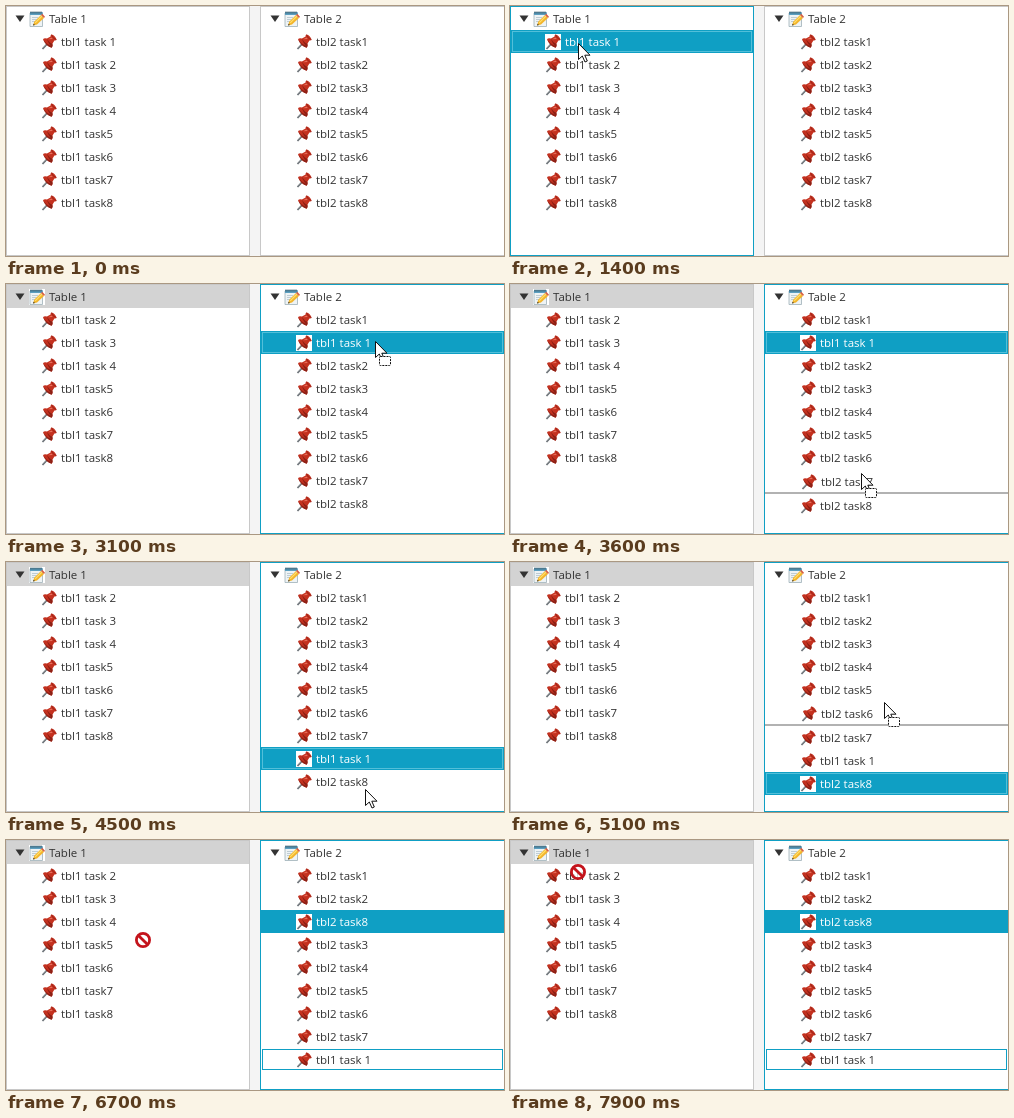
Write an HTML page that moves like this. It is 498x250 px and loops after 8 s.

```html
<!DOCTYPE html>
<html lang="en">
<head>
<meta charset="utf-8">
<title>Drag tasks between trees</title>
<style>
  html, body { margin: 0; width: 100%; height: 100%; overflow: hidden; background: #f4f4f4; }
  svg { display: block; }
  text { font: 11.5px "Open Sans", "Noto Sans", sans-serif; white-space: pre; }
</style>
</head>
<body>
<svg width="498" height="250" viewBox="0 0 498 250">
  <defs>
    <g id="pin">
      <path d="M1.5 15 7 9" stroke="#555b60" stroke-width="1.7"/>
      <path d="M1.5 15 6 10" stroke="#a9b0b5" stroke-width=".6"/>
      <path d="M2 5.2Q3.2 3.8 6 4.6L9.6 2.6Q9.2 1 10.6.5 13.6 1.2 15.6 5.4 15 6.8 13.4 6.4L11.4 9.8Q12.2 12.6 10.6 13.8 4.6 11.6 2 5.2Z" fill="#c4311f"/>
      <path d="M2 5.2Q4.6 11.6 10.6 13.8 12.2 12.6 11.4 9.8 7.6 8.6 6 4.6 7 9.6 10.2 11.8 5 10 2 5.2Z" fill="#8c2015"/>
      <path d="M7.2 5.2 10.4 3.4 11.8 5Z" fill="#e8705c"/>
      <path d="M10.6.7Q11.4 4.4 15.4 5.6" fill="none" stroke="#98251a" stroke-width=".8"/>
    </g>
    <g id="pad">
      <path d="M1 2H13.5V15.5H1Z" fill="#eef3f5" stroke="#9fb0b8" stroke-width=".8"/>
      <path d="M1 1.2H13.8V4H1Z" fill="#5c9fc0"/>
      <path d="M1.5 1.5H13.5" stroke="#27495a" stroke-width="2" stroke-dasharray="1 1"/>
      <path d="M3 6.5H9M3 8.5H7.5M3 10.5H6" stroke="#b3c3cb" stroke-width=".8"/>
      <path d="M4 14.6 5.2 10.8 12 4 15 7 8 13.6Z" fill="#f3b52c"/>
      <path d="M6.2 11.8 13 5" stroke="#ffdf6b" stroke-width="1.2"/>
      <path d="M12 4 13.3 2.8 16 5.7 15 7Z" fill="#d95f45"/>
      <path d="M4 14.6 4.6 12.7 6 14.1Z" fill="#333"/>
    </g>
    <path id="arrow" d="M.5.5V16.5L4.3 13 7 19 9.3 18 6.8 12.2H12Z" fill="#fff" stroke="#111"/>
    <g id="drag">
      <use href="#arrow"/>
      <rect x="4.5" y="15.5" width="11" height="9" rx="1" fill="#fff" stroke="#111" stroke-dasharray="2 1"/>
    </g>
    <g id="deny" fill="none" stroke="#c4141c" stroke-width="2.8">
      <circle r="6.6" fill="#fff" fill-opacity=".75"/>
      <path d="M-4.6-4.6 4.6 4.6"/>
    </g>
  </defs>
  <g id="trees"></g>
  <use id="cursor"/>
</svg>
<script>
const LOOP = 8000, TICK = 100, ROW = 23;
const BLUE = '#0f9fc4', RING = '#52bfd9', GREY = '#d3d3d3';
const PANELS = [{ x: 0, w: 244, dx: 0 }, { x: 254, w: 245, dx: 255 }];

const nums = [1, 2, 3, 4, 5, 6, 7, 8];
const ones = nums.map(n => `tbl1 task${n < 5 ? ' ' : ''}${n}`);
const twos = nums.map(n => `tbl2 task${n}`);
const rest = ones.slice(1), moved = ones[0];
const insert = (list, i, item) => [...list.slice(0, i), item, ...list.slice(i)];
const second = insert(twos, 1, moved);
const third = insert(twos, 7, moved);
const fourth = [...insert(twos.slice(0, 7), 2, twos[7]), moved];

// sel: selected row per panel; ring: focused row of the active panel
const STATES = [
  { at: 0, lists: [ones, twos], sel: [-1, -1], active: -1, ring: -1 },
  { at: 1100, lists: [ones, twos], sel: [1, -1], active: 0, ring: 1 },
  { at: 2300, lists: [rest, second], sel: [0, 2], active: 0, ring: 0 },
  { at: 3000, lists: [rest, second], sel: [0, 2], active: 1, ring: 2 },
  { at: 4000, lists: [rest, third], sel: [0, 8], active: 1, ring: 8 },
  { at: 4700, lists: [rest, third], sel: [0, 9], active: 1, ring: 9 },
  { at: 5900, lists: [rest, fourth], sel: [0, 3], active: 1, ring: 9 }
];

// time, x, y, cursor shape from that time on
const PATH = [
  [0, 346, 150, ''], [100, 346, 150, 'arrow'], [900, 68, 37, 'arrow'],
  [1500, 68, 37, 'drag'], [1800, 340, 40, 'drag'], [2100, 371, 46, 'drag'],
  [2300, 371, 46, 'arrow'], [2700, 371, 46, 'arrow'], [2900, 369, 57, 'arrow'],
  [3100, 369, 57, 'drag'], [3500, 351, 189, 'drag'], [4000, 351, 189, 'arrow'],
  [4400, 359, 227, 'arrow'], [4800, 359, 227, 'drag'], [5400, 389, 52, 'drag'],
  [5900, 389, 52, 'arrow'], [6200, 387, 78, 'drag'], [6400, 262, 86, 'drag'],
  [6700, 137, 100, 'deny'], [7100, 160, 90, 'deny'], [7600, 76, 86, 'deny'],
  [7800, 64, 25, 'deny'], [7900, 68, 32, 'deny'], [8000, 68, 32, 'deny']
];

const trees = document.getElementById('trees');
const cursor = document.getElementById('cursor');
const rect = (x, y, w, h, attrs) => `<rect x="${x}" y="${y}" width="${w}" height="${h}" ${attrs}/>`;

function drawRow(panel, name, i, y, look) {
  const { x, w, dx } = panel, { fill, ring, over, bright } = look;
  const off = over ? 1 : 0, head = i === 0;
  const ix = dx + (head ? 23 : 35) + off, iy = y + 4 + off;
  const ink = bright ? '#fff' : '#333';
  let out = '';
  if (fill) out += rect(x + 1, y, w - 2, ROW, `fill="${fill}"`) + rect(ix, iy, 16, 16, 'fill="#fff"');
  if (ring) out += rect(x + 2.5, y + 1.5, w - 5, ROW - 3, `fill="none" stroke="${fill ? RING : BLUE}"`);
  if (over) out += rect(x + 1, y + ROW, w - 2, 2, 'fill="#b2b2b2"');
  if (head) out += `<path d="M${dx + 9.5} ${y + 8.5}h9l-4.5 6.5z" fill="${ink}"/>`;
  out += `<use href="#${head ? 'pad' : 'pin'}" x="${ix}" y="${iy}"/>`;
  return out + `<text x="${ix + 20}" y="${y + 16 + off}" fill="${ink}">${name}</text>`;
}

function drawPanel(state, p, hover) {
  const panel = PANELS[p], active = state.active === p;
  let out = rect(panel.x + .5, .5, panel.w - 1, 249, `fill="#fff" stroke="${active ? BLUE : '#c8c8c8'}"`);
  let y = 1;
  [`Table ${p + 1}`, ...state.lists[p]].forEach((name, i) => {
    const chosen = state.sel[p] === i, over = p === 1 && hover === i;
    out += drawRow(panel, name, i, y, {
      fill: chosen && (active ? BLUE : GREY),
      bright: chosen && active,
      ring: active && state.ring === i,
      over
    });
    y += ROW + (over ? 2 : 0);
  });
  return out;
}

function pointer(t) {
  const i = PATH.findLastIndex(k => k[0] <= t);
  const a = PATH[i], b = PATH[i + 1];
  const u = (t - a[0]) / (b[0] - a[0]), e = u * u * (3 - 2 * u);
  const mix = n => Math.round(a[n] + (b[n] - a[n]) * e);
  const x = mix(1);
  return { x, y: mix(2), shape: t > 6200 && x < 254 ? 'deny' : a[3] };
}

let last = '';
function render(t) {
  const state = STATES.findLast(s => s.at <= t);
  const { x, y, shape } = pointer(t);
  let hover = shape === 'drag' && x > 254 ? Math.floor((y - 1) / ROW) : -1;
  if (hover === state.sel[1]) hover = -1;
  const key = state.at + ':' + hover;
  if (key !== last) {
    trees.innerHTML = drawPanel(state, 0, hover) + drawPanel(state, 1, hover);
    last = key;
  }
  cursor.setAttribute('href', shape ? '#' + shape : '');
  cursor.setAttribute('transform', `translate(${x} ${y})`);
  cursor.style.display = shape ? '' : 'none';
}

const start = performance.now();
function loop() {
  const t = Math.max(0, performance.now() - start) % LOOP;
  render(Math.floor(t / TICK) * TICK);
  requestAnimationFrame(loop);
}
loop();
</script>
</body>
</html>
```
